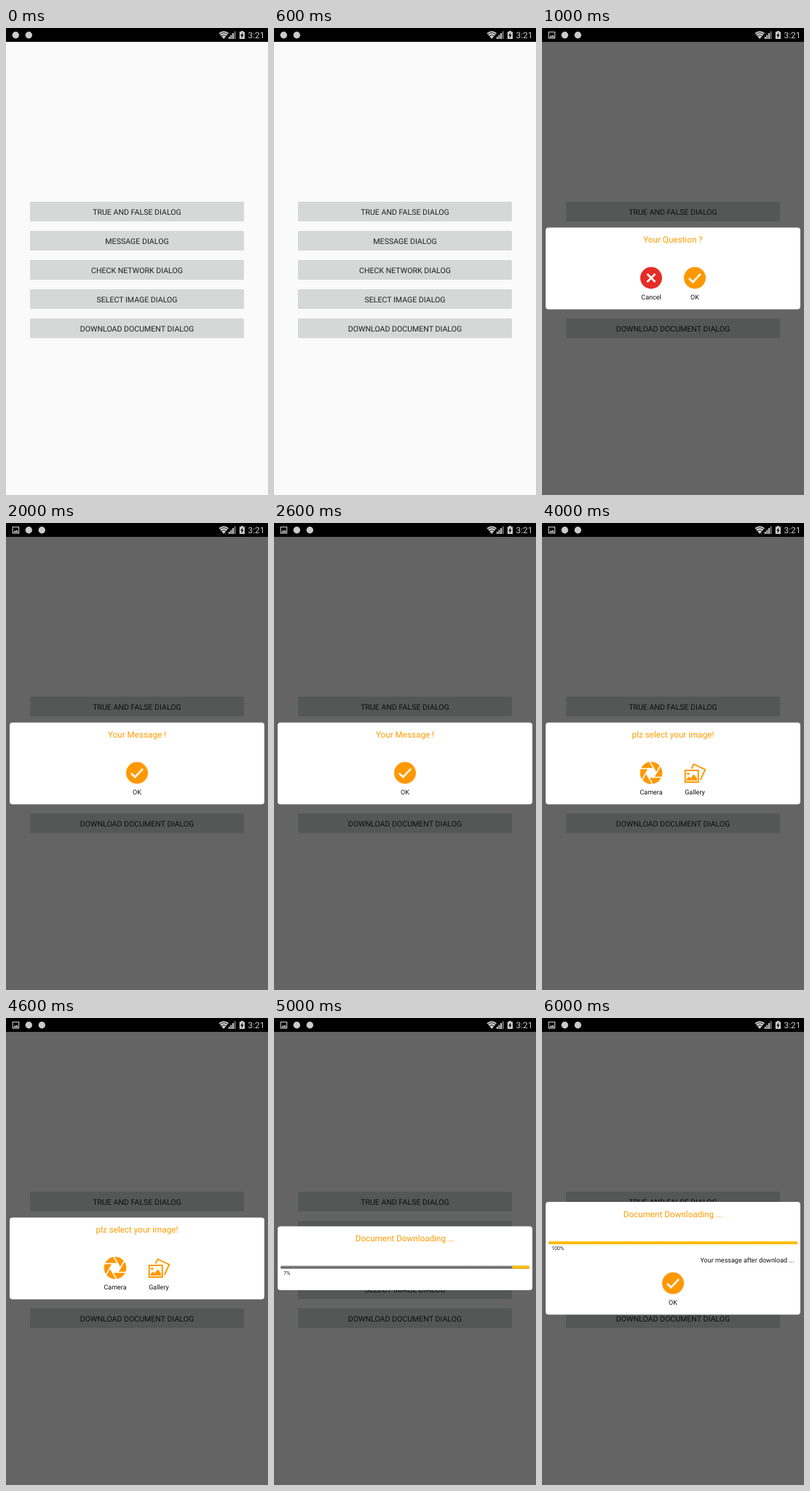
Write an HTML page that moves like this. It is 360 by 640 pixels and loops after 7000 ms.

```html
<!DOCTYPE html>
<html lang="en">
<head>
<meta charset="utf-8">
<title>Dialogs</title>
<style>
  html, body { margin: 0; width: 100%; height: 100%; overflow: hidden; background: #fafafa; }
  svg { display: block; width: 360px; height: 640px; }
  text { font-family: Roboto, sans-serif; text-rendering: geometricPrecision; }
  .mid { text-anchor: middle; }
  .btn rect { fill: #d6d7d7; }
  .btn text { font-size: 10.6px; fill: #212121; }
  .title { font-size: 11.7px; fill: #ff9b00; }
  .label { font-size: 9px; fill: #111; }
  .pct { font-size: 7.2px; fill: #222; }
  .line { fill: none; stroke: #fff; }
  .orange { fill: #ff9800; }
  .red { fill: #e52d27; }

  /* Seven one-second scenes; --i is the scene's place in the loop. */
  .scene { visibility: hidden; animation: show 7s step-end calc((var(--i) - 7) * 1s) infinite; }
  .late { animation: late 7s step-end infinite; }
  .shift { animation: shift 7s step-end infinite; }
  @keyframes show { 0% { visibility: visible } 14.28571%, 100% { visibility: hidden } }
  @keyframes late { 0% { visibility: hidden } 14.28571%, 100% { visibility: visible } }
  @keyframes shift { 0% { transform: none } 14.28571%, 100% { transform: translateX(18px) } }
</style>
</head>
<body>
<svg viewBox="0 0 360 640">
  <defs>
    <linearGradient id="track" x2="0" y2="1">
      <stop stop-color="#929292"/><stop offset="1" stop-color="#555"/>
    </linearGradient>
    <linearGradient id="fill" x2="0" y2="1">
      <stop stop-color="#ffc61a"/><stop offset="1" stop-color="#ffb300"/>
    </linearGradient>
    <g id="ok">
      <circle class="orange" r="15"/>
      <path class="line" stroke-width="2.6" d="M-8 .5L-2.7 5.6 8-5.6"/>
    </g>
    <g id="cancel">
      <circle class="red" r="15"/>
      <path class="line" stroke-width="2.7" d="M-5.5-5.5L5.5 5.5M5.5-5.5L-5.5 5.5"/>
    </g>
    <g id="offline">
      <circle class="red" r="15"/>
      <g class="line" stroke-width="1.8">
        <path d="M-10-3Q0-11 10-3M-6.5 1Q0-4.5 6.5 1"/>
        <circle cy="4.3" r="3"/>
        <path d="M-12 10L11-12" stroke="#e52d27" stroke-width="4.6"/>
        <path d="M-11.5 9.8L11-11.2"/>
      </g>
    </g>
    <path id="blade" class="line" stroke-width="1.6" d="M3.5 6.06L12.65-9.8"/>
    <g id="camera">
      <circle class="orange" r="15.3"/>
      <path fill="#fff" d="M7 0L3.5 6.06H-3.5L-7 0-3.5-6.06H3.5z"/>
      <use href="#blade"/>
      <use href="#blade" transform="rotate(60)"/>
      <use href="#blade" transform="rotate(120)"/>
      <use href="#blade" transform="rotate(180)"/>
      <use href="#blade" transform="rotate(240)"/>
      <use href="#blade" transform="rotate(300)"/>
    </g>
    <g id="gallery">
      <path fill="none" stroke="#ff9800" stroke-width="1.9" d="M-4.5-6L-1.5-12 14.3-4.5 7.7 9.5"/>
      <rect x="-13.3" y="-3.4" width="18" height="16" fill="#fff" stroke="#ff9800" stroke-width="2"/>
      <circle class="orange" cx="-9.2" cy="1.3" r="1.7"/>
      <path class="orange" d="M-11.3 10.5V8.3L-8 5-5.6 7.2-1.5 1.8 2.8 7.2V10.5z"/>
    </g>
  </defs>

  <rect width="360" height="640" fill="#fafafa"/>
  <g id="menu"></g>
  <rect class="late" y="19" width="360" height="621" opacity=".6"/>

  <rect width="360" height="19"/>
  <g fill="#ccc">
    <g class="late">
      <path d="M8.6 5h9.6v9.4H8.6zM9.7 6.1v7.2h7.4V6.1z" fill-rule="evenodd"/>
      <path d="M10.2 12.6l2-2.7 1.3 1.5 1.6-2.2 1.8 3.4z"/>
    </g>
    <g class="shift">
      <circle cx="13.3" cy="9.8" r="4.7"/>
      <circle cx="31.3" cy="9.8" r="4.7"/>
    </g>
    <path d="M299.2 15L292.4 7Q299.2 1.6 306 7z"/>
    <path d="M293.7 8.8Q299.2 4.3 304.7 8.8M295.7 11.1Q299.2 8.2 302.7 11.1" fill="none" stroke="#000" stroke-width=".8"/>
    <path d="M305.8 12h1.9v3h-1.9zM308.4 9.5h1.9V15h-1.9zM311 7h1.9v8H311z"/>
    <path d="M313.6 4.5h2V15h-2z" fill="#777"/>
    <path d="M320.8 5.2h2V4h3v1.2h2.2V15h-7.2z"/>
    <path d="M325.3 6.2l-3.2 4.3h1.9l-.6 3.4 3.3-4.5h-1.9z" fill="#000"/>
    <text x="332.6" y="13.8" font-size="11.8">3:21</text>
  </g>

  <g id="dialogs"></g>
</svg>
<script>
  const mid = (cls, x, y, s) => `<text class="mid ${cls}" x="${x}" y="${y}">${s}</text>`;
  const icon = (id, x, y, label) =>
    `<use href="#${id}" x="${x}" y="${y}"/>` + (label ? mid("label", x, y + 29, label) : "");
  const bar = (y, w, color) =>
    `<rect x="${351 - w}" y="${y}" width="${w}" height="4" rx="1.5" fill="url(#${color})"/>`;
  const progress = (y, pct) => bar(y, 342, "track") + bar(y, 342 * pct / 100, "fill") +
    `<text class="pct" x="13" y="${y + 12}">${pct}%</text>`;
  const dialog = (i, top, height, title, body) =>
    `<g class="scene" style="--i:${i}">
      <rect x="5" y="${top}" width="350" height="${height}" rx="4" fill="#fff"/>
      ${mid("title", 180, top + 20.5, title)}${body}</g>`;

  menu.innerHTML = ["TRUE AND FALSE", "MESSAGE", "CHECK NETWORK", "SELECT IMAGE", "DOWNLOAD DOCUMENT"]
    .map((s, i) => `<g class="btn" transform="translate(0 ${238 + 40 * i})">
      <rect x="33" width="294" height="27" rx="1.5"/>${mid("", 180, 17.6, s + " DIALOG")}</g>`).join("");

  dialogs.innerHTML = [
    dialog(1, 273.5, 112, "Your Question ?",
      icon("cancel", 150, 342.5, "Cancel") + icon("ok", 210, 342.5, "OK")),
    dialog(2, 273.5, 112, "Your Message !", icon("ok", 180, 342.5, "OK")),
    dialog(3, 273.5, 112, "Plz check your network and try again!", icon("offline", 180, 342.5, "OK")),
    dialog(4, 273.5, 112, "plz select your image!",
      icon("camera", 150, 342.5, "Camera") + icon("gallery", 210, 342.5, "Gallery")),
    dialog(5, 285.5, 87.5, "Document Downloading ...", progress(339.5, 7)),
    dialog(6, 252, 154.5, "Document Downloading ...", progress(306, 100) +
      `<text class="label" x="346.5" y="334.5" text-anchor="end">Your message after download ...</text>` +
      icon("ok", 180, 363.5, "OK"))
  ].join("");
</script>
</body>
</html>
```
